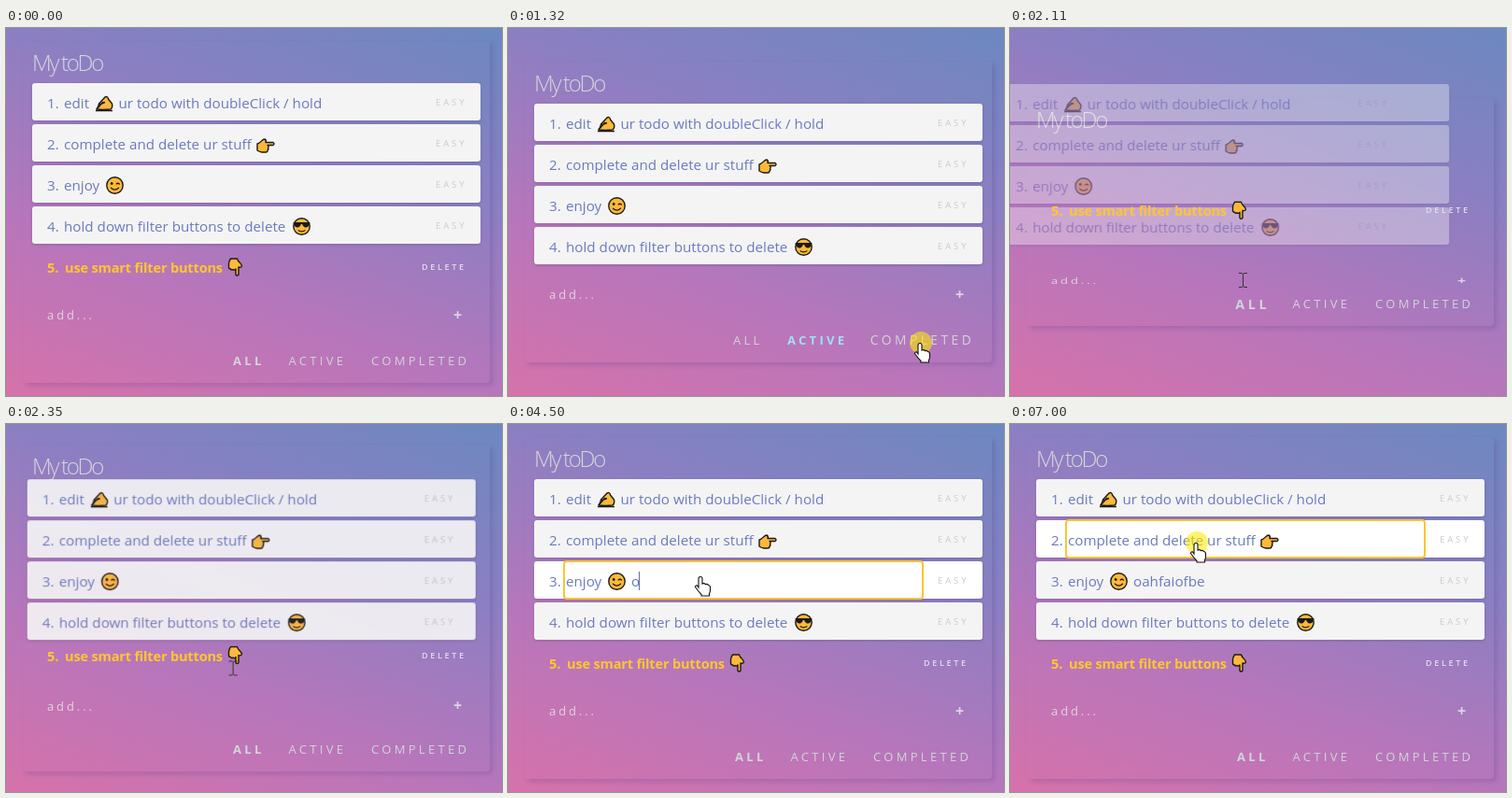
Animation of 531 by 394 pixels, one loop 8 s. Source, as an HTML page:

```html
<!DOCTYPE html>
<html lang="en">
<head>
<meta charset="utf-8">
<title>My toDo</title>
<style>
/* --s: how far the card is shrunk at top and bottom; --n: the shrink it is heading for */
@property --s { syntax: "<number>"; inherits: true; initial-value: 0; }
@property --n { syntax: "<number>"; inherits: true; initial-value: 0; }

html, body { margin: 0; width: 100%; height: 100%; overflow: hidden; }
.stage {
  position: relative; width: 531px; height: 394px; overflow: hidden;
  background: linear-gradient(20deg, #d672aa, #b776bb 33%, #8b7fc2 67%, #6c88c0);
  animation: shrink 8s infinite, target 8s step-end infinite;
}
.card {
  position: absolute; left: 18px; width: 500px; border-radius: 4px;
  top: calc(14px + var(--s) * 1px); bottom: calc(14px + var(--s) * 1px);
  box-shadow: 3px 3px 5px rgba(70, 50, 130, .2);
}
svg { position: absolute; left: 0; top: 0; }
text { font: 15.2px "Open Sans", "Noto Sans", sans-serif; white-space: pre; }

.title { font-size: 24px; font-weight: 300; letter-spacing: -2.3px; fill: #d6d4da;
  transform: translateY(calc(var(--s) * 1px)); }
.rows { animation: rows 8s infinite; }
.rows text { fill: #6b7abf; }
.row { fill: #f4f4f4; filter: drop-shadow(0 1px 1.5px rgba(50, 30, 90, .25)); }
.row2 { animation: hover2 8s step-end infinite; }
.row3 { animation: hover3 8s step-end infinite; }
.rows .tag { font-size: 9.5px; letter-spacing: 2.9px; fill: #cbcbd2; animation: tag 8s infinite; }
.edit { fill: #fff; stroke: #fbc52f; stroke-width: 2; }
.edit2 { animation: edit2 8s step-end infinite; }
.edit3 { animation: edit3 8s step-end infinite; }
.caret { fill: #5d6bb5; }

.done { transform: translateY(calc(var(--s) * -1px)); animation: done 8s infinite; }
.done text { font-size: 14.6px; font-weight: 700; letter-spacing: -.2px; fill: #ffc62e; }
.done .del { font-size: 9px; font-weight: 600; letter-spacing: 2.7px; fill: #e3dcec; }

.add {
  --k: calc((366 - 2 * var(--s)) / (366 - 2 * var(--n)));
  transform: translateY(calc((14 + var(--s) + var(--k) * (293 - 2 * var(--n))) * 1px)) scaleY(var(--k));
}
.add text { font-size: 13px; letter-spacing: 2.9px; fill: #dcd6e2; }
.add .plus { font-size: 16px; font-weight: 700; letter-spacing: 0; }

.filters { transform: translateY(calc(var(--s) * -1px)); }
.filters text { font-size: 13px; letter-spacing: 3.3px; fill: #d0d5d8;
  transform-box: fill-box; transform-origin: center; }
.all { animation: all 8s infinite, allBold 8s step-end infinite; }
.active { animation: active 8s infinite, activeBold 8s step-end infinite; }
.completed { animation: completed 8s infinite, completedBold 8s step-end infinite; }

.cursor { animation: move 8s ease-in-out infinite; }
.hand { fill: #fff; stroke: #111; stroke-width: 1.1; animation: hand 8s step-end infinite; }
.beam { fill: none; stroke: #333; animation: beam 8s step-end infinite; }
.click { fill: #ffeb00; animation: click 8s infinite; }

@keyframes shrink {
  0%, 30.75%, 100% { --s: 0; }
  8.75% { --s: 0; animation-timing-function: ease-in; }
  10.125% { --s: 13; animation-timing-function: ease-out; }
  12.5%, 16.6% { --s: 22; animation-timing-function: ease-in; }
  18.5% { --s: 10; }
  23%, 24.5% { --s: 88; animation-timing-function: ease-in; }
  26.375% { --s: 61; animation-timing-function: ease-out; }
}
@keyframes target {
  0%, 16.6%, 24.5%, 100% { --n: 0; }
  8.75% { --n: 22; }
  18.5% { --n: 88; }
}
@keyframes rows {
  0%, 30.75%, 100% { translate: 0 0; opacity: 1; }
  8.75% { translate: 0 0; opacity: 1; animation-timing-function: ease-in; }
  10.125% { translate: 0 13px; animation-timing-function: ease-out; }
  12.5%, 16.6% { translate: 0 22px; opacity: 1; animation-timing-function: ease-in; }
  18.5% { translate: 0 10px; opacity: 0; }
  24.5% { translate: -60px 1.6px; opacity: 0; animation-timing-function: ease-in; }
  26.375% { translate: -38px 1px; opacity: .38; animation-timing-function: ease-out; }
}
@keyframes tag {
  0%, 18.5%, 30.75%, 100% { translate: 0 0; }
  24.5% { translate: -80px 0; animation-timing-function: ease-in; }
  26.375% { translate: -50px 0; animation-timing-function: ease-out; }
}
@keyframes done {
  0%, 6.75%, 20.5%, 100% { translate: 0 0; opacity: 1; }
  8.5% { translate: 0 0; opacity: 0; }
  16.6% { translate: -60px 0; opacity: 0; }
}
@keyframes hover2 { 0% { fill: #f4f4f4; } 84.4% { fill: #fbfbfb; } 87.3%, 100% { fill: #fff; } }
@keyframes hover3 {
  0%, 84.4%, 100% { fill: #f4f4f4; }
  32%, 72% { fill: #fbfbfb; }
  39.25% { fill: #fff; }
}
@keyframes edit2 { 0% { opacity: 0; } 87.3%, 100% { opacity: 1; } }
@keyframes edit3 { 0%, 72%, 100% { opacity: 0; } 39.25% { opacity: 1; } }

@keyframes all {
  0%, 6.75%, 29%, 100% { translate: 0 0; scale: 1; }
  7.5%, 17% { translate: -2px 0; scale: 1; }
  18.5%, 23% { translate: -7px 0; scale: 1; }
  24.5%, 26.4% { translate: 0 0; scale: 1.1; }
}
@keyframes allBold { 0%, 24.5%, 100% { font-weight: 700; } 7% { font-weight: 400; } }
@keyframes active {
  0%, 4.5% { translate: 0 0; scale: 1; fill: #d0d5d8; }
  6.75% { translate: 0 0; scale: 1.11; fill: #d0d5d8; }
  7.5% { translate: -3px 0; }
  10.1% { translate: -2px 0; scale: 1.11; fill: #b0d2e0; }
  13.2% { scale: 1.11; }
  14.8%, 16.8% { translate: -3.5px 0; scale: 1; fill: #9fe0fa; }
  18.5%, 24.5% { translate: -5px 0; scale: 1; fill: #d0d5d8; }
  26%, 100% { translate: 0 0; scale: 1; fill: #d0d5d8; }
}
@keyframes activeBold { 0%, 16.9%, 100% { font-weight: 400; } 7% { font-weight: 700; } }
@keyframes completed {
  0%, 14.8%, 26%, 100% { translate: 0 0; scale: 1; fill: #d0d5d8; }
  16.5% { translate: 0 0; scale: 1.06; fill: #d0d5d8; }
  18.5% { translate: -4px 0; scale: 1.1; }
  19.5% { scale: 1.1; }
  21%, 24.5% { translate: -5px 0; scale: 1; fill: #ffc62e; }
}
@keyframes completedBold { 0%, 24.5%, 100% { font-weight: 400; } 16.9% { font-weight: 700; } }

@keyframes move {
  0%, 2.75% { translate: 358px 400px; }
  6%, 13% { translate: 367px 356px; }
  15.75%, 18.6% { translate: 441px 338px; }
  23.5%, 28.4% { translate: 249px 270px; }
  33.2%, 33.8% { translate: 175px 171px; }
  35%, 83.1% { translate: 206px 164px; }
  85.6%, 100% { translate: 199px 128px; }
}
@keyframes hand { 0%, 29.4%, 100% { opacity: 1; } 25% { opacity: 0; } }
@keyframes beam { 0%, 29.4%, 100% { opacity: 0; } 25% { opacity: 1; } }
@keyframes click {
  0%, 6.3%, 8.7%, 15.8%, 18.4%, 23.7%, 25.9%, 36.75%, 38.6%, 39%, 41.7%, 85.7%, 86.8%, 87% { opacity: 0; }
  6.6%, 7.8%, 16.1%, 17.4%, 24%, 25%, 37%, 38.2%, 39.25%, 40.6%, 86%, 86.5%, 87.3%, 100% { opacity: .58; }
}
</style>
</head>
<body>
<div class="stage">
  <div class="card"></div>
  <svg width="531" height="394" viewBox="0 0 531 394">
    <defs>
      <g id="face">
        <circle r="8.7" fill="#fcb93a" stroke="#1c1a18" stroke-width="1.4"/>
      </g>
      <g id="wink" fill="none" stroke="#1c1a18" stroke-width="1.3" stroke-linecap="round">
        <use href="#face"/>
        <circle cx="-3.3" cy="-2" r=".8" fill="#1c1a18"/>
        <path d="M1.6-1.6Q3.4-3 5-1.4M-4 2.8Q0 6.4 4 2.8"/>
      </g>
      <g id="cool">
        <use href="#face"/>
        <path d="M-9-4.5H9L7.5-.5Q6 1.4 3.5 1Q1.2.4.6-2.4H-.6Q-1.2.4-3.5 1Q-6 1.4-7.5-.5Z" fill="#1c1a18"/>
        <path d="M-3.8 4Q0 6.6 3.8 4" fill="none" stroke="#1c1a18" stroke-width="1.2"/>
      </g>
      <path id="point" fill="#fcb93a" stroke="#1c1a18" stroke-width="1.4" stroke-linejoin="round"
        d="M-9-2C-5-3-4-7-1-7Q1-6 0-3.5H8Q10-2 8-.5H2Q4 1 2.5 2.5Q3.5 4 2 5Q2 7 0 7H-4Q-7 6.5-9 5Z"/>
      <g id="write" stroke="#1c1a18" stroke-width="1.4" stroke-linejoin="round">
        <path d="M-8 6Q-6 3-5.5 0L1-7Q4-8.5 4.5-5L8.5 0Q9.5 4 7 6L-1 6.5Z" fill="#fcb93a"/>
        <path d="M-9 7.5H9M-5 1L1-1.5M-8 6L-1-2" fill="none"/>
      </g>
      <rect id="bar" x="28" width="480" height="40" rx="3"/>
      <rect id="field" x="60" width="384" height="40" rx="3"/>
    </defs>

    <text class="title" x="28" y="46">My toDo</text>

    <g class="rows">
      <use class="row" href="#bar" y="59"/>
      <use class="row row2" href="#bar" y="103"/>
      <use class="row row3" href="#bar" y="147"/>
      <use class="row" href="#bar" y="191"/>
      <use class="edit edit2" href="#field" y="103"/>
      <use class="edit edit3" href="#field" y="147"/>

      <text x="44" y="86">1.</text><text x="62" y="86">edit</text>
      <use href="#write" x="105" y="81"/>
      <text x="120.5" y="86">ur todo with doubleClick / hold</text>
      <text class="tag" x="460" y="83">EASY</text>

      <text x="44" y="130">2.</text><text x="62" y="130">complete and delete ur stuff</text>
      <use href="#point" x="278" y="126"/>
      <text class="tag" x="460" y="127">EASY</text>

      <text x="44" y="174">3.</text><text x="62" y="174">enjoy</text>
      <use href="#wink" x="116.5" y="168.5"/>
      <text id="typed" x="132" y="174"></text>
      <rect class="caret" id="caret" y="158" width="1" height="20"/>
      <text class="tag" x="460" y="171">EASY</text>

      <text x="44" y="218">4.</text><text x="62" y="218">hold down filter buttons to delete</text>
      <use href="#cool" x="316.5" y="212.5"/>
      <text class="tag" x="460" y="215">EASY</text>
    </g>

    <g class="done">
      <text x="44" y="262">5.</text><text x="63" y="262">use smart filter buttons</text>
      <use href="#point" transform="translate(245.5 256) rotate(90)"/>
      <text class="del" x="445" y="259">DELETE</text>
    </g>

    <g class="add">
      <text x="44" y="5">add...</text>
      <text class="plus" x="479" y="5.5">+</text>
    </g>

    <g class="filters">
      <text class="all" x="243" y="361">ALL</text>
      <text class="active" x="302.5" y="361">ACTIVE</text>
      <text class="completed" x="391" y="361">COMPLETED</text>
    </g>

    <g class="cursor">
      <circle class="click" cx="1" cy="-1" r="12"/>
      <path class="hand" d="M-2 1.5a2 2 0 0 1 4 0V7q2-1 3.4.6q2-.6 3 .9q2.1.2 2.1 2.5V14q0 2-1 3.5V20H1v-1.5q-3-3-6.5-8q0-2 2-1.6L-2 11Z"/>
      <path class="beam" d="M-4-7.5H-1L.5-6.5L2-7.5H5M.5-6.5V6.5M-4 7.5H-1L.5 6.5L2 7.5H5"/>
    </g>
  </svg>
</div>
<script>
const LOOP = 8000;
const word = "oahfaiofbe";
const keyTimes = [4500, 4560, 4620, 4690, 4690, 4750, 4820, 4820, 4880, 5050];
const caretOn = [[3140, 3640], [3670, 4170], [4500, 5530]];
const typed = document.getElementById("typed");
const caret = document.getElementById("caret");

function draw(now) {
  const t = now % LOOP;
  const text = word.slice(0, keyTimes.filter(k => k <= t).length);
  if (typed.textContent !== text) typed.textContent = text;
  const start = t < 3670 ? 126 : 131;
  caret.setAttribute("x", text ? Math.round(131 + typed.getComputedTextLength()) : start);
  caret.style.opacity = caretOn.some(([a, b]) => t >= a && t < b) ? 1 : 0;
  requestAnimationFrame(draw);
}
requestAnimationFrame(draw);
</script>
</body>
</html>
```
